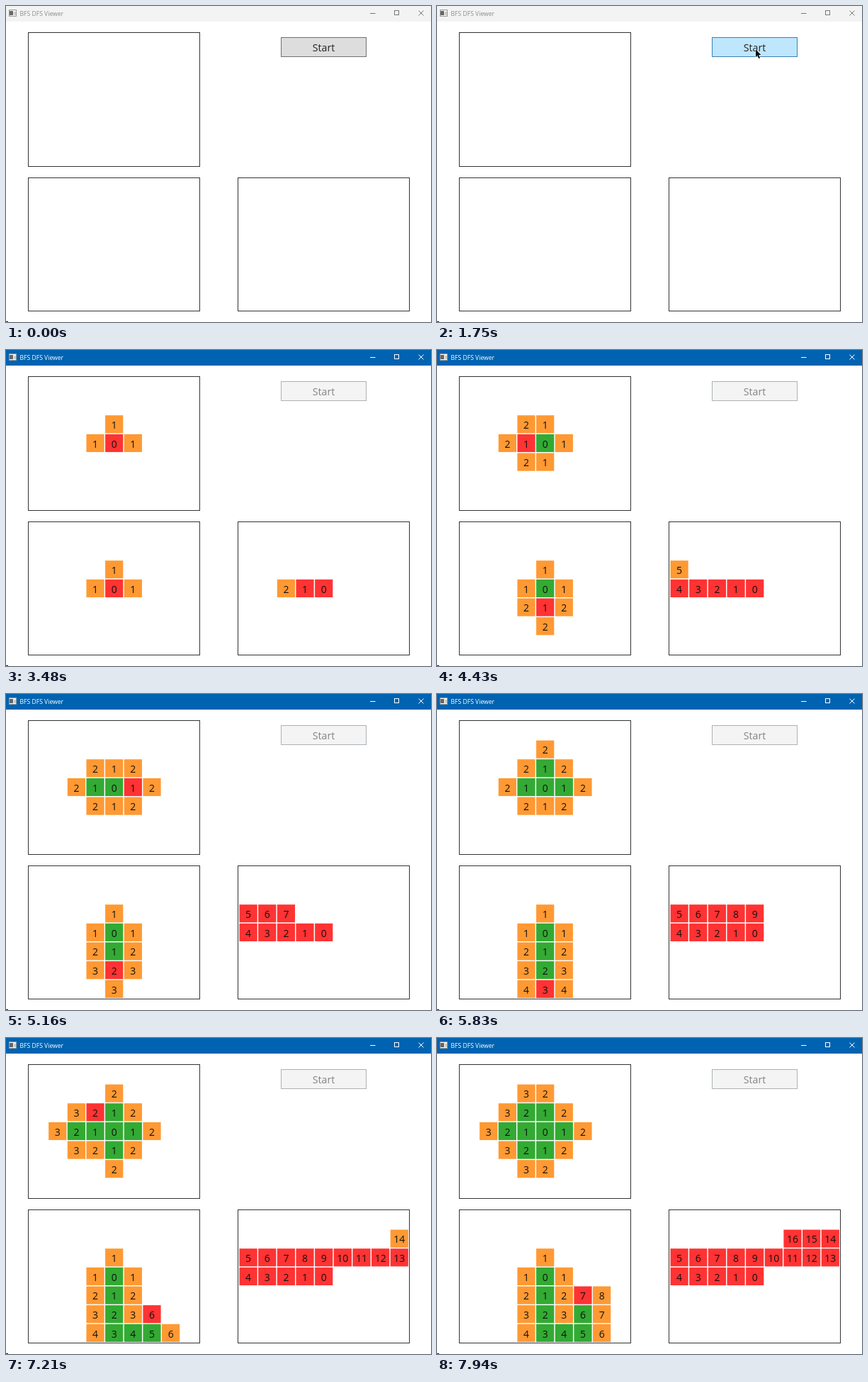
An HTML page with a canvas that plays this animation: 600 px wide and 446 px high, repeating every 8 s.

```html
<!DOCTYPE html>
<html lang="en">
<head>
<meta charset="utf-8">
<title>BFS DFS Viewer</title>
<style>
  html, body { margin: 0; width: 100%; height: 100%; overflow: hidden; background: #fff; }
  canvas { display: block; }
</style>
</head>
<body>
<canvas id="stage" width="600" height="446"></canvas>
<script>
const ctx = document.getElementById('stage').getContext('2d');
const LOOP = 8000, COLS = 9, ROWS = 7;
const ORANGE = '#ff9933', RED = '#ff3333', GREEN = '#33aa33';
const FONT = '"Open Sans", "Noto Sans", sans-serif';
const ACTIVATE = 1950, DISABLE = 2020;

// Moments at which every search advances by one step
const TICKS = [
  2890, 3020, 3150, 3280, 3480, 3630, 3740, 3970, 4100, 4230, 4430, 4560,
  4690, 4880, 5020, 5160, 5350, 5490, 5620, 5830, 5955, 6080, 6300, 6430,
  6610, 6760, 6880, 7030, 7210, 7360, 7480, 7690, 7815, 7940
];

const START = { c: 4, r: 3, depth: 0 };
const keyOf = n => n.r * COLS + n.c;

// Left, right, up, down
function neighbours({ c, r, depth }) {
  return [[-1, 0], [1, 0], [0, -1], [0, 1]]
    .map(([dc, dr]) => ({ c: c + dc, r: r + dr, depth: depth + 1 }))
    .filter(n => n.c >= 0 && n.c < COLS && n.r >= 0 && n.r < ROWS);
}

function* frontierSearch(take) {
  const frontier = [START], seen = new Set([keyOf(START)]);
  yield [START, ORANGE];
  while (frontier.length) {
    const node = frontier[take]();
    yield [node, RED];
    for (const next of neighbours(node)) {
      if (seen.has(keyOf(next))) continue;
      seen.add(keyOf(next));
      frontier.push(next);
      yield [next, ORANGE];
    }
    yield [node, GREEN];
  }
}

function* recursiveSearch(node, seen) {
  seen.add(keyOf(node));
  yield [node, ORANGE];
  yield [node, RED];
  for (const next of neighbours(node)) {
    if (!seen.has(keyOf(next))) yield* recursiveSearch(next, seen);
  }
  yield [node, GREEN];
}

const PANELS = [
  { x: 31.5, y: 37.5, h: 189, steps: [...frontierSearch('shift')] },
  { x: 31.5, y: 242.5, h: 188, steps: [...frontierSearch('pop')] },
  { x: 327.5, y: 242.5, h: 188, steps: [...recursiveSearch(START, new Set())] }
];

function box(x, y, w, h, fill, stroke) {
  ctx.fillStyle = fill;
  ctx.fillRect(x, y, w, h);
  if (!stroke) return;
  ctx.strokeStyle = stroke;
  ctx.lineWidth = 1;
  ctx.strokeRect(x, y, w, h);
}

function label(text, x, y, size, color, align = 'center') {
  ctx.font = `${size}px ${FONT}`;
  ctx.textAlign = align;
  ctx.fillStyle = color;
  ctx.fillText(text, x, y);
}

function drawTitleBar(active) {
  const ink = active ? '#fff' : '#777';
  box(0, 0, 600, 22, active ? '#0063b1' : '#f3f3f3');
  box(4.5, 5.5, 10, 9, '#f4f4f4', '#999');
  box(5, 7, 5, 6, '#666');
  box(11, 8, 3, 5, '#ccc');
  label('BFS DFS Viewer', 19.5, 13.5, 8.6, active ? '#fff' : '#8c8c8c', 'left');
  ctx.strokeStyle = ink;
  ctx.lineWidth = 1;
  ctx.strokeRect(548.5, 6.5, 6, 6);
  ctx.beginPath();
  ctx.moveTo(514, 10.5); ctx.lineTo(521.5, 10.5);
  ctx.moveTo(582.5, 6.5); ctx.lineTo(589.5, 13.5);
  ctx.moveTo(589.5, 6.5); ctx.lineTo(582.5, 13.5);
  ctx.stroke();
}

function drawButton(t, cursor) {
  let [fill, border, ink] = ['#dddddd', '#707070', '#222'];
  if (t >= DISABLE) [fill, border, ink] = ['#f4f4f4', '#adb2b5', '#838383'];
  else if (t >= ACTIVATE) [fill, border] = ['#c4e5f6', '#2c628b'];
  else if (cursor && cursor[0] < 509 && cursor[1] < 72) [fill, border] = ['#bee6fd', '#3c7fb1'];
  box(388.5, 44.5, 120, 27, fill, border);
  label('Start', 448.5, 64, 14.1, ink);
}

function drawPanel({ x, y, h, steps }, count) {
  box(x, y, 242, h, '#fff', '#333');
  const cells = new Map();
  for (const [node, color] of steps.slice(0, count)) cells.set(keyOf(node), [node, color]);
  for (const [{ c, r, depth }, color] of cells.values()) {
    const left = x + 2 + c * 26.65, top = y + 1.4 + r * 26.65;
    box(left, top, 25.2, 25.2, color);
    label(depth, left + 12.6, top + 18.7, 14, '#111');
  }
}

function cursorAt(t) {
  if (t >= 390 && t < 600) {
    const hop = Math.floor((t - 390) / 70);
    return [582 + hop, 426 - 32 * hop];
  }
  if (t >= 1140 && t < 2220) {
    const hop = Math.min(9, Math.floor((t - 1140) / 67.7));
    const left = (1 - hop / 9) ** 2;
    return [450 + 147 * left, 61.5 + 84 * left];
  }
  if (t >= 2220 && t < 2290) return [488, 75];
  if (t >= 2290 && t < 2360) return [547, 100];
  return null;
}

function drawCursor([x, y]) {
  ctx.save();
  ctx.translate(x, y);
  ctx.beginPath();
  for (const [px, py] of [[0, 0], [0, 10.2], [2.4, 8.2], [4.2, 12.6], [6, 11.9], [4.2, 7.6], [7.4, 7.4]]) {
    ctx.lineTo(px, py);
  }
  ctx.closePath();
  ctx.strokeStyle = '#fff';
  ctx.lineWidth = 1;
  ctx.stroke();
  ctx.fillStyle = '#000';
  ctx.fill();
  ctx.restore();
}

function draw(now) {
  const t = now % LOOP;
  const cursor = cursorAt(t);
  const count = TICKS.filter(tick => tick <= t).length;
  box(0, 0, 600, 446, '#fff');
  drawTitleBar(t >= ACTIVATE);
  drawButton(t, cursor);
  for (const panel of PANELS) drawPanel(panel, count);
  box(0, 445, 3, 1, '#222');
  if (cursor) drawCursor(cursor);
}

const began = performance.now();
function tick() {
  draw(performance.now() - began);
  requestAnimationFrame(tick);
}
tick();
</script>
</body>
</html>
```
